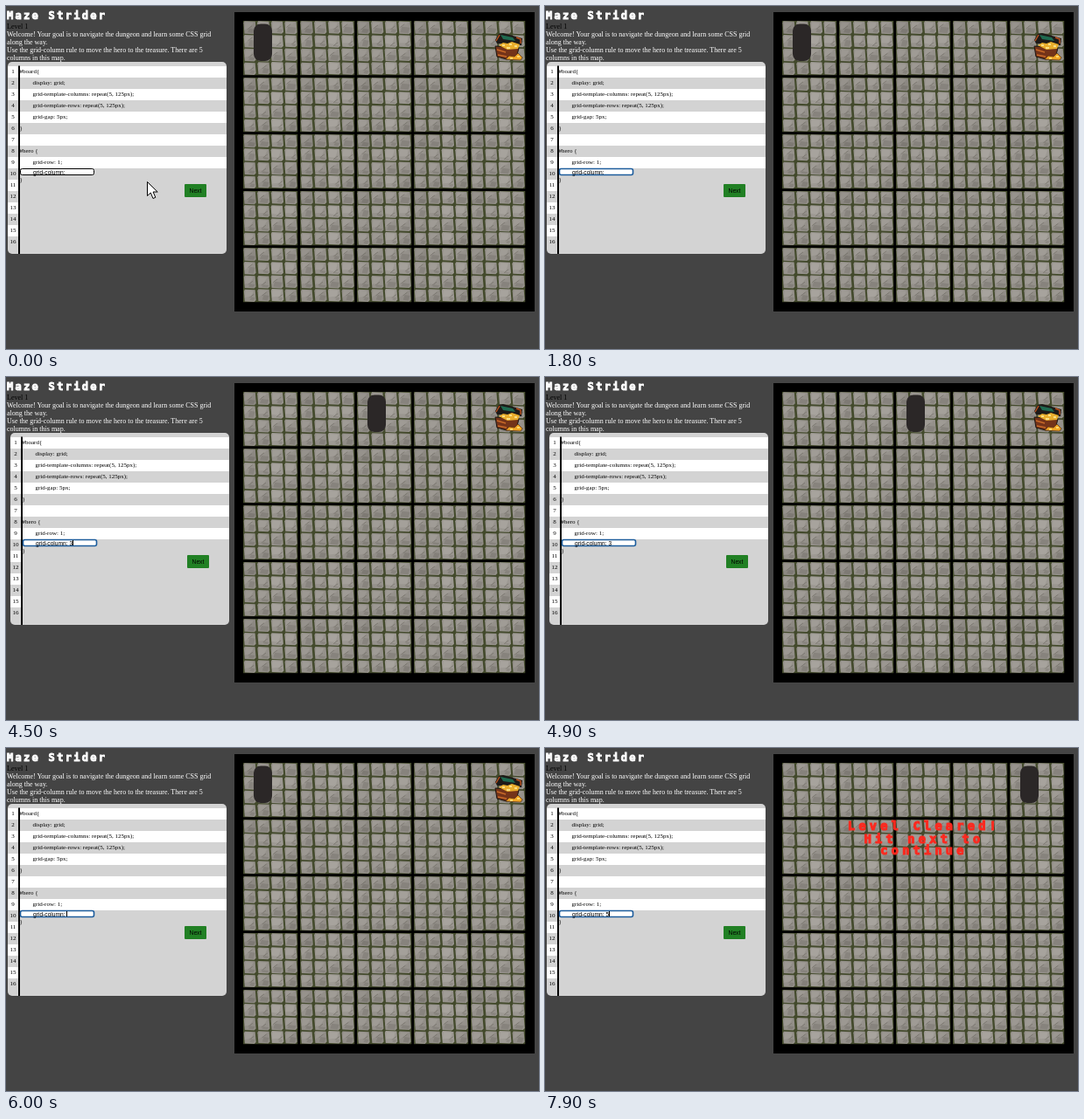
These frames come from a looping animation (609x393 px, 8 s). An HTML page:

```html
<!DOCTYPE html>
<html lang="en">
<head>
<meta charset="utf-8">
<title>Maze Strider</title>
<style>
  html, body { margin: 0; width: 100%; height: 100%; overflow: hidden; background: #444; }
  svg { display: block; }
  text { white-space: pre; }
  .intro { font: 8px "Liberation Serif", serif; fill: #fff; }
  .code { font: 7px "Liberation Serif", serif; }
  .field { font: 6.667px "Liberation Sans", sans-serif; }
  .pixel { font: bold 12px "DejaVu Sans Mono", monospace; letter-spacing: 2.3px; fill: #fff; stroke: #fff; stroke-width: .9; }
  #cleared { font-size: 13.5px; letter-spacing: 4.3px; fill: #fb2a20; stroke: #fb2a20; stroke-width: 1.2; text-anchor: middle; }
</style>
</head>
<body>
<svg width="609" height="393" viewBox="0 0 609 393">
  <defs>
    <g id="tile"></g>
    <clipPath id="tileClip"><rect width="62.5" height="62.5"/></clipPath>
  </defs>

  <text class="pixel" x="1" y="15">Maze Strider</text>
  <g class="intro">
    <text x="1" y="26" style="fill:#000">Level 1</text>
    <text x="1" y="35">Welcome! Your goal is to navigate the dungeon and learn some CSS grid</text>
    <text x="1" y="44">along the way.</text>
    <text x="1" y="53">Use the grid-column rule to move the hero to the treasure. There are 5</text>
    <text x="1" y="62">columns in this map.</text>
  </g>

  <g id="panel">
    <rect x="2" y="64" width="250" height="220" rx="5" fill="#d3d3d3"/>
    <g id="rows"></g>
    <rect x="14" y="68.5" width="2" height="215.5"/>
    <g id="lines" class="code"></g>
    <rect id="input" x="16.5" y="186.5" width="84" height="7" rx="2" fill="#fff"/>
    <text id="value" class="field" x="31" y="192.6"></text>
    <rect id="caret" y="187" width="1" height="6"/>
    <rect x="204" y="204" width="25" height="15" rx="1" fill="#218024"/>
    <text class="field" x="209.6" y="213.8">Next</text>
  </g>

  <rect x="261" y="7" width="343" height="343"/>
  <g id="board"></g>
  <rect id="hero" x="13" y="20.5" width="21" height="42.5" rx="8" fill="#2b2727"/>

  <g id="chest" stroke-linejoin="round">
    <path d="M559 39L563 32L568 31L590 37L589 45L561 43Z" fill="#1d1a18"/>
    <path d="M565 33L579 36L582 40L568 38Z" fill="#1f6a50"/>
    <path d="M560 40L564 33M583 36L588 38V43" fill="none" stroke="#b8501e" stroke-width="1.5"/>
    <path d="M559 46L586 48L583 60L572 61L561 58Z" fill="#743319" stroke="#1d1512"/>
    <path d="M563 45L568 42L573 43L578 41L587 44L585 49L573 50Z" fill="#e9ae2d"/>
    <path d="M567 45h3M575 44h3M581 46h3M572 48h4" stroke="#fff0a0" stroke-width="1.5"/>
    <path d="M561 50L571 53M562 56L572 58" stroke="#c96a29" stroke-width="1.5"/>
    <path d="M571 61L575 57L581 58L585 54L590 59L588 62Z" fill="#f0a525" stroke="#593012" stroke-width=".7"/>
    <path d="M576 60h3M584 58h3" stroke="#ffe680" stroke-width="1.5"/>
  </g>

  <g id="cleared" class="pixel">
    <text x="433" y="93.5">Level Cleared!</text>
    <text x="433" y="109">Hit next to</text>
    <text x="433" y="122">continue</text>
  </g>

  <path id="arrow" d="M.5 .5V16.5L4.300 13L7 19.5L9.800 18.300L7.100 12H12.200Z" fill="#fff" stroke="#000"/>
  <g id="beam" fill="none">
    <path d="M-3 -8.5H3M0 -8.5V8.5M-3 8.5H3" stroke="#fff" stroke-width="2"/>
    <path d="M-3 -8.5H3M0 -8.5V8.5M-3 8.5H3" stroke="#000"/>
  </g>
</svg>

<script>
const $ = id => document.getElementById(id);
const LOOP = 8000, STEP = 100, PITCH = 65, ROW = 13, STONE = 15.6;

let seed = 11;
const random = () => (seed = seed * 16807 % 2147483647) / 2147483647;
const between = (low, high) => low + random() * (high - low);

// One mossy stone tile, repeated over the whole board
function stone(column, row) {
  const x = column * STONE, y = row * STONE, tone = between(140, 158);
  const grey = shift => `rgb(${tone + shift | 0},${tone + shift - 4 | 0},${tone + shift - 10 | 0})`;
  const l = x + between(.2, .9), r = x + between(14.6, 15.3);
  const t = y + between(.2, .9), b = y + between(14.6, 15.3);
  const cx = between(l + 4, r - 4), cy = between(t + 4, b - 4);
  return `<path fill="${grey(0)}" d="M${l + 1} ${t}L${r - 1} ${t + .5}L${r} ${b - 2}L${r - 2} ${b}L${l + 1} ${b - .5}L${l} ${t + 2}Z"/>
    <path fill="${grey(10)}" d="M${l + 2} ${t + 1}L${r - 3} ${t + 2}L${cx} ${cy}L${l + 1} ${b - 5}Z"/>
    <path fill="${grey(-14)}" d="M${cx} ${cy + 1}L${r - 1} ${cy + 2}L${r - 3} ${b - 1}L${cx - 2} ${b - 2}Z"/>
    <path stroke="#6b675e" stroke-width=".6" d="M${cx - 2} ${cy + 2}L${cx} ${cy}L${cx + 3} ${cy - 2}"/>`;
}

let stones = '<rect width="62.5" height="62.5" fill="#434a2c"/>';
for (let i = 0; i < 16; i++) stones += stone(i % 4, i >> 2);
$('tile').innerHTML = `<g fill="none" clip-path="url(#tileClip)">${stones}</g>`;

let tiles = '';
for (let i = 0; i < 25; i++)
  tiles += `<use href="#tile" x="${271 + i % 5 * PITCH}" y="${17 + (i / 5 | 0) * PITCH}"/>`;
$('board').innerHTML = tiles;

const code = ['#board{', '  display: grid;', '  grid-template-columns: repeat(5, 125px);',
  '  grid-template-rows: repeat(5, 125px);', '  grid-gap: 5px;', '}', '', '#hero {', '  grid-row: 1;'];
const codeText = (line, y) =>
  `<text x="${line.startsWith(' ') ? 30.5 : 15.5}" y="${y}">${line.trim()}</text>`;

let rows = '', lines = '';
for (let i = 0; i < 16; i++) {
  const y = 69 + i * ROW;
  if (i % 2 == 0) rows += `<rect x="2" y="${y}" width="${i < 9 ? 250 : 12}" height="${ROW}" fill="#fff"/>`;
  lines += `<text x="8" y="${y + 8.3}" text-anchor="middle">${i + 1}</text>`;
  if (code[i]) lines += codeText(code[i], y + 8.3);
}
$('rows').innerHTML = rows;
$('lines').innerHTML = lines + codeText('}', 201);

// Timelines: [start time, ...values]
const keys = [[0, ''], [1200, ''], [3000, '3'], [5900, ''], [6000, ''], [6600, '5']];
const heroColumns = [[0, 1], [3100, 3], [6000, 1], [6700, 5]];
const pointer = [
  [0, 161, 201], [100, 142, 198], [200, 131, 196], [400, 122, 194], [500, 106, 191],
  [600, 96, 190, true], [700, 92, 190, true], [1000, 92, 189, true],
  [1500, 103, 170], [1600, 119, 100], [1700, 139, 6], [1800, -50, -50]
];
const current = (timeline, t) => timeline.findLast(entry => entry[0] <= t);
const progress = (t, start, end) => Math.min(1, Math.max(0, (t - start) / (end - start)));

function shake(t) {
  const beat = (t - 4300) / 100;
  return beat >= 1 && beat < 10 ? (beat % 2 ? -3 : 3) : 0;
}

function draw(t) {
  const focused = t >= 1200;
  const [keyTime, typed] = current(keys, t);
  $('value').textContent = 'grid-column: ' + typed;
  $('caret').setAttribute('x', typed ? 73 : 69);
  $('caret').style.opacity = focused && Math.floor((t - keyTime) / 600) % 2 == 0 ? 1 : 0;
  $('input').setAttribute('stroke', focused ? '#1c5c9c' : '#000');
  $('input').setAttribute('stroke-width', focused ? 1.6 : 1);
  $('panel').setAttribute('transform', `translate(${shake(t)})`);

  const column = current(heroColumns, t)[1];
  $('hero').setAttribute('transform', `translate(${271 + (column - 1) * PITCH - 1})`);
  $('cleared').style.opacity = progress(t, 6600, 7500);
  $('chest').style.opacity = 1 - progress(t, 6900, 7900);

  const [, x, y, isBeam] = current(pointer, t);
  $('arrow').style.display = isBeam ? 'none' : '';
  $('beam').style.display = isBeam ? '' : 'none';
  $(isBeam ? 'beam' : 'arrow').setAttribute('transform', `translate(${x} ${y})`);
}

const started = performance.now();
function tick() {
  const elapsed = (performance.now() - started) % LOOP;
  draw(Math.floor(elapsed / STEP) * STEP);
  requestAnimationFrame(tick);
}
tick();
</script>
</body>
</html>
```
